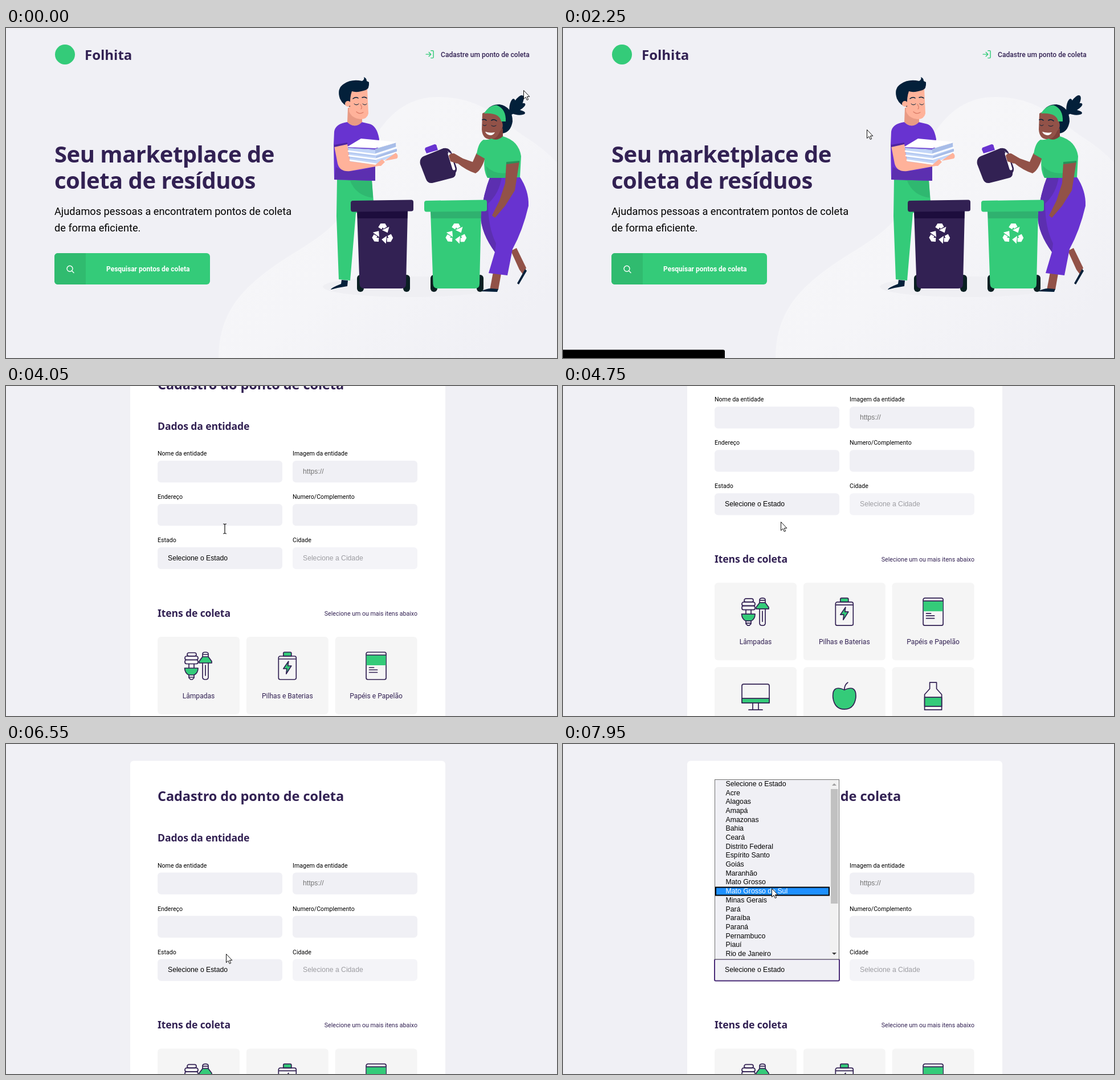
An HTML page that plays this animation: 967x579 px, repeating every 8000 ms.

```html
<!DOCTYPE html>
<html lang="pt">
<head>
<meta charset="utf-8">
<title>Coleta</title>
<style>
html, body { margin: 0; height: 100%; overflow: hidden; background: #f0f0f5; }
svg.stage { display: block; width: 967px; height: 579px; }
text { font-family: Roboto, sans-serif; white-space: pre; }
.head { font-family: "Noto Sans", sans-serif; font-weight: 700; fill: #322153; }
.brand { font-size: 24px; }
.h1 { font-size: 40px; letter-spacing: -.5px; }
.h2 { font-size: 23.5px; letter-spacing: -.08px; }
.h3 { font-size: 17.6px; letter-spacing: -.13px; }
.lead { font-size: 18.2px; }
.link { font-size: 12.1px; font-weight: 500; fill: #322153; }
.cta { font-size: 12px; font-weight: 700; fill: #fff; }
.label { font-size: 10.6px; }
.ctl { font: 12.2px "Liberation Sans", Arial, sans-serif; }
.opt { font: 12.3px "Liberation Sans", Arial, sans-serif; }
.item { font-size: 12.1px; fill: #322153; text-anchor: middle; }
.line { fill: none; stroke-linecap: round; stroke-linejoin: round; }
.ico { fill: none; stroke: #322153; stroke-width: 1.7; stroke-linejoin: round; stroke-linecap: round; }
.ico .g { fill: #34cb79; }
</style>
</head>
<body>
<svg class="stage" viewBox="0 0 967 579">
<defs>
  <linearGradient id="haze" x1=".2" y1="0" x2="1" y2=".75">
    <stop offset="0" stop-color="#f7f7f9"/><stop offset=".55" stop-color="#f5f5f8"/><stop offset="1" stop-color="#f0f0f5"/>
  </linearGradient>
  <g id="arm">
    <path d="M-4.200-9.300L-1.500-13.500H2L4-10" fill="none" stroke="#fff" stroke-width="6"/>
    <path d="M-1-6.500L10-11.500 7.500-2.500Z" fill="#fff"/>
  </g>
  <g id="recycle">
    <use href="#arm"/><use href="#arm" transform="rotate(120)"/><use href="#arm" transform="rotate(240)"/>
  </g>
  <g id="bin">
    <rect x="616" y="433" width="12" height="30" rx="6" fill="#0a1f22"/>
    <rect x="697" y="433" width="12" height="30" rx="6" fill="#0a1f22"/>
    <path d="M616 321H705L702 449Q702 457 694 457H629Q621 457 620.500 449Z"/>
    <path d="M616 321H705L704.500 334H617Z" fill="#10002f" opacity="var(--shade)"/>
    <path d="M609 303L711 301.500Q715 301.500 715 305.500V318Q715 321.500 711 321.500L609 322.500Q605 322.500 605 318V307Q605 303 609 303Z"/>
    <use href="#recycle" transform="translate(661 362) scale(1.15)"/>
  </g>
</defs>

<g id="home">
  <path fill="url(#haze)" d="M373 579C373 490 425 446 500 398C560 362 596 336 612 280C632 205 672 121 757 121C835 121 865 160 910 190Q945 212 967 236V579Z"/>
  <ellipse cx="708" cy="454" rx="152" ry="18" fill="#efeff3"/>
  <circle cx="103.500" cy="46.500" r="17.500" fill="#34cb79"/>
  <text class="head brand" x="138" y="55.500">Folhita</text>
  <path class="line" transform="translate(735 37.500) scale(.72)" stroke="#34cb79" stroke-width="2" d="M15 3h4a2 2 0 0 1 2 2v14a2 2 0 0 1-2 2h-4M10 17l5-5-5-5M15 12H3"/>
  <text class="link" x="763" y="50.500">Cadastre um ponto de coleta</text>
  <text class="head h1" x="85" y="236">Seu marketplace de</text>
  <text class="head h1" x="85" y="282">coleta de resíduos</text>
  <text class="lead" x="85" y="328">Ajudamos pessoas a encontratem pontos de coleta</text>
  <text class="lead" x="85" y="356.500">de forma eficiente.</text>
  <rect x="85" y="395" width="273" height="55" rx="6" fill="#34cb79"/>
  <path d="M140 395H91a6 6 0 0 0-6 6V444a6 6 0 0 0 6 6H140Z" fill="#30bb6f"/>
  <path class="line" stroke="#fff" stroke-width="1.400" d="M116 426.500l3 3M117 422.300a5 5 0 1 1-10 0a5 5 0 1 1 10 0"/>
  <text class="cta" x="176" y="427">Pesquisar pontos de coleta</text>

  <g id="man">
    <path fill="#34cb79" d="M581 266L642 267 645 304 614 325 604 443 584 441 580 330Z"/>
    <path fill="#2fb870" d="M596 267L642 267 644 298Q614 294 604 268Z"/>
    <path fill="#03203a" d="M589 442L600 443 599 453Q585 455 570 459 570 456 588 449Z"/>
    <path fill="#6833d0" d="M599 165Q578 168 576 182L575 205 576 266 648 268 648 240 655 195Q651 171 637 168L624 165Q612 177 599 165Z"/>
    <path fill="#5c2fb0" d="M579 244Q600 258 648 243V268L576 266Z"/>
    <path fill="#e89a84" d="M600 140H625V165Q612 178 599 165Z"/>
    <path fill="#ffb29a" d="M602 112L634 106 636 150Q634 160 622 160 606 158 602 146Z"/>
    <path fill="#03203a" d="M604 138Q592 137 586 124 580 106 593 98 606 89 625 93 630 90 628 86 633 88 633 93L637 95Q638 107 631 109 616 114 607 111 603 122 604 138Z"/>
    <circle cx="600" cy="133" r="5" fill="#ffb29a"/>
    <g class="line" stroke="#03203a" stroke-width="1.500">
      <path d="M609 124q5-4 9-1M625 122q5-2 8 1"/>
      <path stroke-width="1" d="M611 133q4 4 8 0M626 133q4 4 7 0"/>
      <path stroke="#d97b66" stroke-width="1.200" d="M622 134q4 6 1 8M615 147q5 5 12 1"/>
    </g>
    <path fill="#ffb29a" d="M576 207L599 203 603 229 655 237 654 242 604 251Q586 253 582 238Z"/>
    <path fill="#4e249f" d="M576 205L599 201 599 204 576 209Z"/>
    <path fill="#c3d6f8" d="M600 210L648 214 684 202 686 225 652 240 604 234Z"/>
    <path fill="#fff" d="M598 209L623 194 686 200 648 211Z"/>
    <path fill="#a8bde8" d="M648 212L684 202V208L648 220ZM649 225L686 212V217L650 231Z"/>
    <path class="line" stroke="#fff" stroke-width="2.600" d="M601 216L648 222 685 210M602 224L649 230 686 218M604 232L651 239 684 224"/>
    <path class="line" stroke="#a8bde8" d="M600 211L648 213 684 202M601 219L648 225M603 227L649 233"/>
    <path fill="#ffb29a" d="M646 242L660 230 665 235 658 242ZM664 233L684 219Q690 224 686 229L676 231Z"/>
  </g>

  <g id="woman">
    <g fill="#03203a">
      <ellipse cx="898" cy="133" rx="7" ry="17" transform="rotate(32 898 133)"/>
      <ellipse cx="889" cy="138" rx="5.500" ry="14" transform="rotate(8 889 138)"/>
      <ellipse cx="899" cy="140" rx="5" ry="14" transform="rotate(60 899 140)"/>
      <ellipse cx="898" cy="148" rx="4.500" ry="13" transform="rotate(95 898 148)"/>
      <path d="M842 147Q849 134 866 134 889 138 889 164 886 183 871 185L860 170Z"/>
    </g>
    <path fill="#7d4039" d="M852 184L872 176V198Q860 202 850 194Z"/>
    <path fill="#925248" d="M836 150Q850 141 866 152L871 166Q874 175 867 181 861 197 847 195 836 193 835 178Z"/>
    <path fill="#34cb79" d="M839 150Q847 136 861 135.500 878 142 877 164L869 164Q866 148 839 150Z"/>
    <g class="line" stroke="#03203a">
      <path stroke-width="1.600" d="M836 161q4-2 7 1M852 162q5-3 9 1"/>
      <path d="M837 170q3 3 6 0M852 171q4 3 8 0"/>
    </g>
    <path fill="#fff" d="M841 182Q850 185 858 183 855 189 849 188 843 187 841 182Z"/>
    <path fill="#925248" d="M886 391L896 386 913 421 907 432 901 424Z"/>
    <path fill="#03203a" d="M911 423L914 426 900 450 897 448Z"/>
    <path fill="#925248" d="M855 428L869 431 864 459 849 460Z"/>
    <path fill="#03203a" d="M833 462Q844 457 851 457L864 458 862 463Z"/>
    <path fill="#6833d0" d="M850 260L901 260Q918 285 917 312 907 355 889 388L880 434 847 430 858 393Q834 360 833 330 838 290 850 260Z"/>
    <path fill="#5c2fb0" d="M850 260L870 261Q866 290 846 308 846 350 860 378L858 393Q834 360 833 330 838 290 850 260Z"/>
    <path fill="#925248" d="M826 219L841 228Q834 250 824 255 808 250 792 237L778 234 776 222 786 220 802 229 819 235Z"/>
    <path fill="#34cb79" d="M838 196Q846 197 852 194 862 199 872 190 900 198 904 225L902 262 845 263Q837 250 840 229L826 221Q829 201 838 196Z"/>
    <path fill="#2fb870" d="M842 242Q858 258 880 254L880 263H845Z"/>
    <path fill="#925248" d="M878 236L901 234 893 285 876 312 858 333 853 329 866 303 876 272Z"/>
    <path fill="#27925a" d="M878 235L901 233V236L878 239Z"/>
  </g>

  <g id="jug">
    <path class="line" stroke="#322153" stroke-width="4" d="M768 213Q778 211 781 222L789 246Q790 253 783 256"/>
    <path fill="#322153" d="M733 225L765 212Q773 210 776 218L789 253Q790 261 783 263L748 272Q740 273 737 265L727 239Q725 229 733 225Z"/>
    <path class="line" stroke="#fff" stroke-width="5" d="M778 221L786 247"/>
    <path fill="#6833d0" d="M736 210L752 204Q756 204 756 208L758 214 738 220 735 213Z"/>
    <path fill="#925248" d="M777 224Q781 218 788 221L796 226 792 238 780 234Z"/>
  </g>
  <use href="#bin" fill="#322153" style="--shade:.6"/>
  <use href="#bin" fill="#34cb79" style="--shade:.13" transform="translate(129 0)"/>
  <path id="status" d="M0 564.500H281q3 0 3 3V579H0Z"/>
</g>

<g id="form">
  <rect x="218" y="124" width="553" height="909" rx="6" fill="#fff"/>
  <circle cx="96" cy="46.500" r="17.500" fill="#34cb79"/>
  <text class="head brand" x="130" y="55.500">Folhita</text>
  <path class="line" transform="translate(790.500 37) scale(.77)" stroke="#34cb79" stroke-width="2" d="M20 12H5M12 19l-7-7 7-7"/>
  <text class="link" x="818" y="50.500">Voltar para home</text>
  <text class="head h2" x="266" y="195">Cadastro do ponto de coleta</text>
  <text class="head h3" x="266" y="266">Dados da entidade</text>
  <g id="fields"></g>
  <text class="head h3" x="266" y="594">Itens de coleta</text>
  <text class="label" x="722" y="591.500" text-anchor="end" fill="#322153">Selecione um ou mais itens abaixo</text>
  <g id="items"></g>
  <rect x="535" y="943" width="187" height="42" rx="6" fill="#34cb79"/>
  <text class="cta" x="628" y="968" text-anchor="middle">Cadastrar ponto de coleta</text>
</g>

<g id="popup">
  <rect x="266" y="377.500" width="219" height="38" rx="2" fill="#f0f0f5" stroke="#4a2c78" stroke-width="2"/>
  <text class="ctl" x="284" y="400">Selecione o Estado</text>
  <rect x="266.500" y="62.500" width="218" height="315" fill="#f0f0f5" stroke="#707070"/>
  <rect x="468.500" y="63" width="15.500" height="314" fill="#f1f1f1"/>
  <rect x="470" y="79" width="12.500" height="201" fill="#c1c1c1"/>
  <path d="M472 73l4-4 4 4Z" fill="#a0a0a0"/><path d="M472 366l4 4 4-4Z" fill="#404040"/>
  <rect id="mark" x="268" width="199" height="14" fill="#1e90ff" stroke="#000" stroke-width="2"/>
  <g id="options"></g>
</g>

<g id="cursor">
  <path id="arrow" d="M.5.5V15.500L4 12.300 6.300 17.500 8.600 16.500 6.300 11.400H10.800Z" fill="#fff" stroke="#111"/>
  <path id="beam" class="line" stroke="#111" stroke-width="1.200" d="M-2.500-8.500Q-.5-8.500 0-7.500 .5-8.500 2.500-8.500M0-7.500V7.500M-2.500 8.500Q-.5 8.500 0 7.500 .5 8.500 2.500 8.500"/>
  <path id="hand" fill="#fff" stroke="#111" stroke-linejoin="round" d="M-1.500 1Q0-1 1.500 1V7Q4 5.500 5 7.500 7.500 6.500 8 8.500 10.500 8 10.500 10V14L8.500 19H.5L-4.500 12.500Q-5.500 10-3.500 10L-1.500 12Z"/>
</g>
</svg>
<script>
const $ = id => document.getElementById(id);
const show = (id, on) => { $(id).style.display = on ? '' : 'none'; };

const fields = [
  ['Nome da entidade', ''], ['Imagem da entidade', 'https://', '#757575'],
  ['Endereço', ''], ['Numero/Complemento', ''],
  ['Estado', 'Selecione o Estado', '#000'], ['Cidade', 'Selecione a Cidade', '#9d9da2']
];
$('fields').innerHTML = fields.map(([label, value, ink], i) => {
  const x = i % 2 ? 503 : 266, y = 320 + 76 * (i >> 1);
  return `<text class="label" x="${x}" y="${y - 8.7}">${label}</text>
    <rect x="${x}" y="${y}" width="219" height="38.3" rx="6" fill="${i == 5 ? '#f4f4f8' : '#f0f0f5'}"/>
    <text class="ctl" x="${x + 18}" y="${y + 23}" fill="${ink}">${value}</text>`;
}).join('');

// Icons are drawn around x = 0, 50 units tall.
const items = [
  ['Lâmpadas', `<rect x="-20" y="2" width="16" height="6" rx="3"/><rect x="-24" y="8" width="23" height="6.500" rx="3"/>
    <rect x="-24" y="14.500" width="23" height="7" rx="3"/><path d="M-17 21.500V29M-8 21.500V29"/>
    <path class="g" d="M-24.500 29H-1Q-1 38-8 41H-17Q-24 38-24.500 29Z"/><path d="M-17 41V46L-14 49H-11L-8 46V41M-17 45H-8"/>
    <path d="M7 9V4Q7 1 12 1 17 1 17 4V9M8 5H16"/><path class="g" d="M7 9H17L23 17V20H1V17Z"/>
    <path d="M7 20V45Q7 49 12 49 17 49 17 45V20M12 24V42"/>`],
  ['Pilhas e Baterias', `<path class="g" d="M-7 8V3Q-7 1-5 1H5Q7 1 7 3V8Z"/><rect x="-15.500" y="8" width="31" height="41" rx="3"/>
    <path d="M-15 13H15"/><path class="g" d="M2 17L-7 30H-1L-2 39 7 25H1Z"/>`],
  ['Papéis e Papelão', `<rect x="-17.500" y="1" width="35" height="48" rx="3"/><path class="g" stroke="none" d="M-17 6H17V24H-17Z"/>
    <path d="M-17 6H17M-12 28H-4M-12 32H2M-12 36.500H2"/>`],
  ['Resíduos Eletrônicos', `<rect x="-24" y="4" width="48" height="33" rx="3"/><path class="g" d="M-24 29H24V37H-24Z"/><path d="M-5 37V48M5 37V48M-12 49H12"/>`],
  ['Resíduos Orgânicos', `<path class="g" d="M0 14Q-22 4-20 28-17 48 0 48 17 48 20 28 22 4 0 14Z"/><path d="M0 14Q0 5 6 1"/>`],
  ['Óleo de Cozinha', `<path d="M-6 1H6V12L15 22V49H-15V22L-6 12Z"/><path class="g" d="M-15 27H15V43H-15Z"/>`]
];
$('items').innerHTML = items.map(([name, icon], i) => {
  const x = 266 + 155.8 * (i % 3), y = 629 + 148 * (i > 2);
  return `<rect x="${x}" y="${y}" width="144" height="136" rx="6" fill="#f5f5f5"/>
    <g class="ico" transform="translate(${x + 72} ${y + 26})">${icon}</g>
    <text class="item" x="${x + 72}" y="${y + 108}">${name}</text>`;
}).join('');

const states = ('Selecione o Estado,Acre,Alagoas,Amapá,Amazonas,Bahia,Ceará,Distrito Federal,Espírito Santo,Goiás,' +
  'Maranhão,Mato Grosso,Mato Grosso do Sul,Minas Gerais,Pará,Paraíba,Paraná,Pernambuco,Piauí,Rio de Janeiro').split(',');
const ROW = 15.68, TOP = 62;
$('options').innerHTML = states.map((s, i) =>
  `<text class="opt" x="285.5" y="${TOP + 12 + i * ROW}">${s}</text>`).join('');
const options = [...$('options').children];

// Pointer path: time, x, y
const path = [
  [0, 908, 109], [300, 800, 62], [550, 712, 28], [750, 692, 46], [850, 692, 46], [1050, 776, 43],
  [1250, 776, 43], [1550, 650, 105], [1850, 524, 182], [1950, 524, 182], [2100, 528, 175], [2250, 533, 178],
  [2450, 533, 178], [3000, 384, 252.5], [3750, 384, 252.5], [3850, 384, 250.5], [4450, 384, 250.5],
  [4500, 382, 248], [4600, 382, 248], [4750, 382, 238], [5250, 382, 238], [5500, 384, 270], [5750, 380, 299],
  [5950, 380, 299], [6750, 388, 391], [6850, 386, 390], [7450, 386, 390], [7500, 386, 387], [7750, 368, 241],
  [7850, 368, 241], [7900, 367, 251], [7950, 366, 253], [8000, 366, 253]
];
const scrolls = [[0, 0], [3550, 94.6], [4050, 189], [4200, 283.8], [5150, 189], [5950, 94.6]];

function pointer(t) {
  const i = path.findIndex(p => p[0] > t);
  const [a, b] = [path[i - 1], path[i]];
  const k = (t - a[0]) / (b[0] - a[0]);
  return [1, 2].map(n => Math.round((a[n] + (b[n] - a[n]) * k) * 2) / 2);
}

function draw() {
  const t = Math.floor(performance.now() % 8000 / 50) * 50;
  const [x, y] = pointer(t);
  const home = t < 2500, open = t >= 7050;
  const scroll = scrolls.filter(s => s[0] <= t).pop()[1];
  show('home', home);
  show('form', !home);
  show('popup', open);
  show('status', t >= 950);
  $('form').setAttribute('transform', `translate(0 ${-scroll})`);

  const hand = home && x >= 737 && y < 54 && t > 850;
  const beam = t >= 2900 && t < 4500 || t >= 5950 && y > 301 && y < 339 && !open;
  show('hand', hand);
  show('beam', beam);
  show('arrow', !hand && !beam);
  $('cursor').setAttribute('transform', `translate(${x} ${y})`);

  const row = y < 377 ? Math.floor((y - TOP) / ROW) : 0;
  $('mark').setAttribute('y', TOP + 1.3 + row * ROW);
  options.forEach((o, i) => o.setAttribute('fill', i === row ? '#fff' : '#000'));
  requestAnimationFrame(draw);
}
draw();
</script>
</body>
</html>
```
